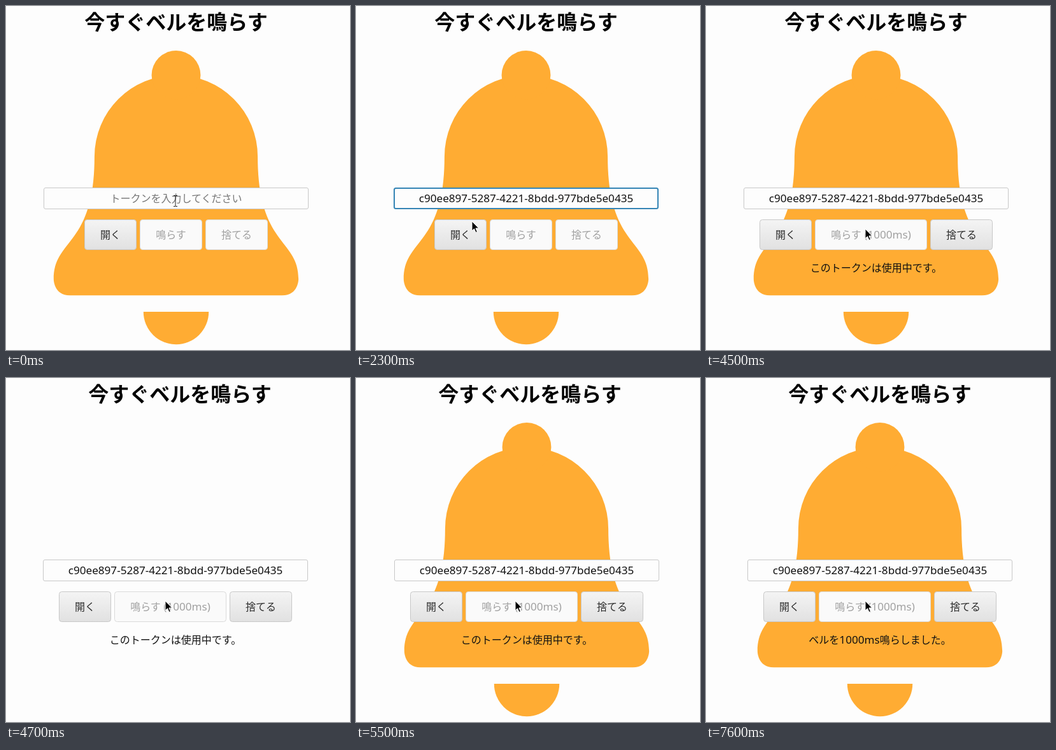
An HTML page that plays this animation: 540 px wide and 540 px high, repeating every 8.3 s.

```html
<!DOCTYPE html>
<html lang="ja">
<head>
<meta charset="utf-8">
<title>今すぐベルを鳴らす</title>
<style>
  html, body { margin: 0; height: 100%; overflow: hidden; background: #fdfdfd; }
  svg { display: block; width: 100%; height: 100%; }
  text { font: 16px "Noto Sans CJK JP", "Noto Sans CJK", sans-serif; text-anchor: middle; fill: #111; white-space: pre; }
  .title { font-size: 32px; font-weight: 700; fill: #000; }
  .latin { font-family: "Noto Sans", sans-serif; font-size: 17.1px; }
  .bell { fill: #ffac33; }
  .field { fill: #fdfdfd; stroke: #c8c8c8; }
  .focus { stroke: #3585b5; stroke-width: 2; }
  .placeholder { fill: #777; }
  .button rect { fill: url(#face); stroke: #c8c8c8; }
  .button text { fill: #2b2b2b; }
  .hover rect { fill: #f7f7f7; }
  .disabled rect { fill: #fafafa; stroke: #dadada; }
  .disabled text { fill: #a0a0a0; }
  .arrow { fill: #000; stroke: #fff; }
  .beam { fill: none; stroke: #222; }
</style>
</head>
<body>
<svg viewBox="0 0 540 540">
  <linearGradient id="face" x2="0" y2="1">
    <stop stop-color="#f4f4f4"/><stop offset="1" stop-color="#e1e1e1"/>
  </linearGradient>
  <g id="stage"></g>
</svg>
<script>
const LOOP = 8300, STEP = 100;
const FOCUS = 1000, PASTE = 1200, BLUR = 2500, OPENED = 2700;
const RING = 4500, SHAKE = 4700, BELL_BACK = 4800, SHAKE_END = 5700, DONE = 7100;
const TOKEN = 'c90ee897-5287-4221-8bdd-977bde5e0435';
const stage = document.getElementById('stage');

// Cursor keys: time, x, y
const cursorKeys = [[0, 266, 306], [2000, 266, 306], [2300, 182, 338], [2400, 182, 350],
  [3400, 182, 350], [3600, 250, 350], [LOOP, 250, 350]];

function cursorAt(t) {
  const i = cursorKeys.findIndex(key => key[0] > t);
  const [t0, x0, y0] = cursorKeys[i - 1], [t1, x1, y1] = cursorKeys[i];
  const k = (t - t0) / (t1 - t0);
  return [x0 + (x1 - x0) * k, y0 + (y1 - y0) * k];
}

function label(text, x, y, cls = '') {
  const runs = text.replace(/[ -~]+/g, run => `<tspan class="latin">${run}</tspan>`);
  return `<text class="${cls}" x="${x}" y="${y}">${runs}</text>`;
}

function bell() {
  return `<g class="bell" transform="translate(0 70) scale(12.81) translate(-18 0)">
    <path d="M28 13c0 11 5 10 5 15 0 0 0 2-2 2H5c-2 0-2-2-2-2 0-5 5-4 5-15a10 10 0 0 1 20 0z"/>
    <circle cx="18" cy="3" r="3"/><path d="M14 32a4 4 0 0 0 8 0z"/></g>`;
}

function field(t) {
  const focused = t >= FOCUS && t < BLUR, filled = t >= PASTE;
  const box = focused ? 'class="field focus" x="-207" y="286" width="414" height="32"'
    : 'class="field" x="-207.5" y="285.5" width="415" height="33"';
  return `<rect ${box} rx="2.5"/>`
    + label(filled ? TOKEN : 'トークンを入力してください', 0, 308, filled ? '' : 'placeholder');
}

function buttons(t) {
  const opened = t >= OPENED;
  const ringState = !opened || t >= RING ? 'disabled' : 'hover';
  const items = [
    ['開く', 82, ''],
    [opened ? '鳴らす (1000ms)' : '鳴らす', opened ? 176 : 98, ringState],
    ['捨てる', 98, opened ? '' : 'disabled']
  ];
  const gap = 5;
  let x = -(items.reduce((sum, item) => sum + item[1] + gap, -gap)) / 2;
  return items.map(([text, width, state]) => {
    const svg = `<g class="button ${state}">
      <rect x="${x + .5}" y="335.5" width="${width - 1}" height="47" rx="4"/>
      ${label(text, x + width / 2, 365)}</g>`;
    x += width + gap;
    return svg;
  }).join('');
}

function message(t) {
  if (t < OPENED) return '';
  const text = t < RING ? 'いつでも / 何度でも'
    : t < DONE ? 'このトークンは使用中です。' : 'ベルを1000ms鳴らしました。';
  return label(text, 0, 417);
}

function cursor(t) {
  const [x, y] = cursorAt(t);
  const shape = y < 319
    ? '<path class="beam" d="M-3-8.5h2.5l.5.5.5-.5H3M0-8V8M-3 8.5h2.5L0 8l.5.5H3"/>'
    : '<path class="arrow" d="M0 0V15L3.5 11.7 6 17.5 8.4 16.5 5.9 10.9H10.7Z"/>';
  return `<g transform="translate(${x} ${y})">${shape}</g>`;
}

function shakeAt(t) {
  if (t < SHAKE || t >= SHAKE_END) return 0;
  const side = t / STEP % 2 ? -1 : 1;
  return side * (t < BELL_BACK ? 7 : 5);
}

function scene(t) {
  const center = t < SHAKE ? 267 : 273;  // the scrollbar vanishes when the shaking starts
  const bellHidden = t >= SHAKE && t < BELL_BACK;
  return label('今すぐベルを鳴らす', center, 37, 'title')
    + `<g transform="translate(${center + shakeAt(t)} 0)">`
    + (bellHidden ? '' : bell()) + field(t) + buttons(t) + message(t) + '</g>' + cursor(t);
}

let shown = -1;
function tick() {
  const t = Math.floor(performance.now() % LOOP / STEP) * STEP;
  if (t !== shown) stage.innerHTML = scene(shown = t);
  requestAnimationFrame(tick);
}
tick();
</script>
</body>
</html>
```
